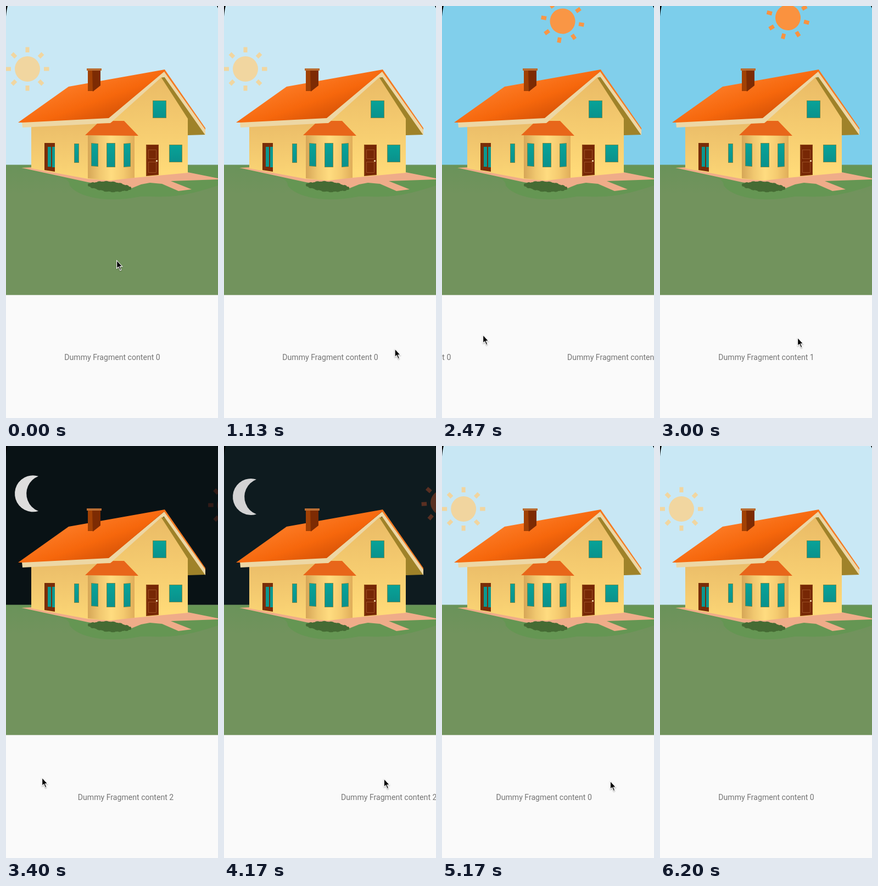
These frames come from a looping animation (386x746 px, 6510 ms). An HTML page with a canvas:

```html
<!DOCTYPE html>
<html lang="en">
<head>
<meta charset="utf-8">
<title>House pager</title>
<style>
  html, body { margin: 0; width: 100%; height: 100%; overflow: hidden; background: #fafafa; }
  canvas { display: block; width: 386px; height: 746px; }
</style>
</head>
<body>
<canvas id="stage" width="386" height="746"></canvas>
<script>
const W = 386, H = 746, LOOP = 6510, HORIZON = 287.5, PAGER_TOP = 523.5;
const DRAG = 250, SETTLE = 260, EXIT = 6150;
const stage = document.getElementById('stage');
const main = stage.getContext('2d');
let c = main;

const SWIPES = [
  { at: 2190, from: 283, to: 75, y: 597, page: 1 },
  { at: 3020, from: 251, to: 66, y: 602, page: 2 },
  { at: 4000, from: 185, to: 341, y: 604, page: 1 },
  { at: 4750, from: 115, to: 305, y: 608, page: 0 }
];

const SCENES = [
  { sky: [201, 232, 245], sun: [39, 114, 0], tint: [241, 214, 160, 1] },
  { sky: [124, 206, 235], sun: [233, 21, 59], tint: [250, 146, 63, 1] },
  { sky: [9, 18, 21], sun: [408, 107, 135], tint: [170, 50, 30, .2] }
];

const lerp = (a, b, k) => a + (b - a) * k;
const mix = (a, b, k) => a.map((v, i) => lerp(v, b[i], k));
const rgba = ([r, g, b, a = 1]) => `rgba(${r | 0},${g | 0},${b | 0},${a})`;

// cubic-bezier(.4, 0, .2, 1)
function ease(x) {
  let lo = 0, hi = 1;
  for (let i = 0; i < 24; i++) {
    const s = (lo + hi) / 2, r = 1 - s;
    if (1.2 * s * r * r + .6 * s * s * r + s * s * s < x) lo = s; else hi = s;
  }
  return lo * lo * (3 - 2 * lo);
}

// The page follows the finger, then settles on the nearest page.
function pageAt(t) {
  let page = 0;
  for (const s of SWIPES) {
    if (t < s.at) break;
    const held = page + (s.from - s.to) / W;
    const u = (t - s.at) / DRAG, v = (t - s.at - DRAG) / SETTLE;
    if (u < 1) return lerp(page, held, u);
    if (v < 1) return lerp(held, s.page, 1 - (1 - v) ** 3);
    page = s.page;
  }
  return page;
}

// Pointer stops [ms, x, y]: wander in, swipe, wait, return, leave
const STOPS = [
  [0, 202, 462], [30, 202, 462], [570, 318, 628], [900, 318, 628],
  ...SWIPES.flatMap(({ at, from, to, y }) => [
    [at - 40, from, y], [at, from, y], [at + DRAG, to, y], [at + DRAG + 150, to, y]
  ]),
  [EXIT, 392, 612]
];

function pointerAt(t) {
  const i = STOPS.findIndex(s => s[0] > t), a = STOPS[i - 1], b = STOPS[i];
  return mix(a, b, (t - a[0]) / (b[0] - a[0])).slice(1);
}

function poly(fill, ...p) {
  c.beginPath();
  for (let i = 0; i < p.length; i += 2) c.lineTo(p[i], p[i + 1]);
  c.closePath();
  c.fillStyle = fill;
  c.fill();
}

function rect(fill, x0, y0, x1, y1) {
  c.fillStyle = fill;
  c.fillRect(x0, y0, x1 - x0, y1 - y0);
}

function disc(x, y, r) {
  c.beginPath();
  c.arc(x, y, r, 0, 7);
  c.fill();
}

function grad(x0, y0, x1, y1, ...colors) {
  const g = c.createLinearGradient(x0, y0, x1, y1);
  colors.forEach((col, i) => g.addColorStop(i / (colors.length - 1), col));
  return g;
}

function pane(x0, y0, x1, y1, skew = 0) {
  const box = (fill, d) => poly(fill, x0 + d, y0 + d, x1 - d, y0 + d + skew,
    x1 - d, y1 - d, x0 + d, y1 - d - skew);
  box('#8d8438', 0);
  box(grad(0, y0, 0, y1, '#08a398', '#0a918c'), .8);
}

function drawGround() {
  rect(grad(0, HORIZON, 0, 340, '#6a935a', '#72935d'), 0, HORIZON, W, PAGER_TOP);
  c.fillStyle = '#659653';
  c.beginPath();
  c.moveTo(20, 290);
  c.bezierCurveTo(70, 310, 118, 305, 116, 325);
  c.bezierCurveTo(130, 345, 180, 358, 245, 345);
  c.bezierCurveTo(290, 345, 310, 350, W, 325);
  c.lineTo(W, 290);
  c.fill();
  poly('#efac89', 28, 293, 46, 292, 331, 301, 386, 312, 386, 314, 300, 317, 338, 332,
    314, 335, 284, 322, 262, 320, 246, 323, 226, 331, 149, 319);
}

function drawWalls() {
  poly(grad(0, 212, 0, 310, '#ebbd69', '#fbd575'),
    46, 215, 190, 208, 190, 316, 149, 313, 46, 294);
  poly(grad(0, 130, 0, 300, '#eabb66', '#ffda78'),
    190, 210, 284, 126, 331, 195, 331, 302, 234, 311, 190, 313);
  poly(grad(149, 0, 234, 0, '#d6a657', '#f0c76f', '#ffdc80', '#f5cb70', '#e0ad59'),
    149, 233, 234, 234, 234, 311, 190, 316, 149, 312);
}

function drawRoof() {
  poly('#9f8229', 283, 130, 291, 128, 363, 233, 331, 234, 331, 204);
  poly('#edd7a5', 289, 118, 363, 223, 363, 234, 288, 128, 283, 129,
    190, 212, 30, 220, 29, 210, 187, 202);
  poly('#f47a22', 289, 115, 363, 221, 363, 224, 288, 119);
  poly(grad(165, 125, 195, 208, '#fc7a24', '#f6670c', '#d25006'),
    22, 211, 114, 146, 289, 115, 289, 118, 187, 203, 30, 211);
  poly('#e8661a', 144, 234, 166, 213, 190, 212, 195, 208, 215, 208, 241, 235);
  poly('#a14105', 149, 116, 158, 116, 158, 154, 149, 154);
  poly('#7d2b03', 157, 116, 172, 116, 172, 144, 158, 155);
  rect('#b96c32', 147, 113, 174, 117);
}

function drawOpenings() {
  poly('#792d09', 70, 248, 89, 248, 89, 300, 70, 297);
  rect('#0a9891', 76, 255, 82, 291);
  rect('#0a9891', 84, 255, 89, 292);
  pane(124, 249, 133, 284);
  pane(155, 248, 168, 291, 1);
  pane(183, 248, 199, 292);
  pane(214, 249, 227, 291, -1);
  pane(267, 171, 292, 203);
  pane(297, 251, 321, 283);
  poly('#8a4212', 255, 251, 278, 251, 278, 306, 255, 308);
  poly('#772705', 257, 252, 277, 252, 277, 305, 257, 307);
  c.strokeStyle = '#a55a2c';
  c.lineWidth = .8;
  c.strokeRect(259.5, 260.5, 14, 16);
  c.strokeRect(259.5, 282.5, 14, 19);
  rect('#e6c79d', 273, 279, 276, 282);
}

function drawBush() {
  c.fillStyle = '#456b34';
  for (let i = 0; i <= 12; i++) {
    const swell = Math.sin(i / 12 * Math.PI);
    disc(152 + i * 6.1, 324 + i * .5, 3 + 6 * swell + i % 2);
  }
}

// The house never moves, so it is painted once.
const house = document.createElement('canvas');
house.width = W;
house.height = H;
c = house.getContext('2d');
[drawGround, drawWalls, drawRoof, drawOpenings, drawBush].forEach(part => part());
c = main;

function drawSun([x, y, turn], tint) {
  c.save();
  c.translate(x, y);
  c.rotate(turn * Math.PI / 180);
  c.fillStyle = rgba(tint);
  disc(0, 0, 23);
  for (let i = 0; i < 8; i++) {
    c.fillRect(30, -3.5, 9.5, 7);
    c.rotate(Math.PI / 4);
  }
  c.restore();
}

function drawMoon(y, alpha) {
  const out = Math.atan2(31.5, 10), inn = Math.atan2(31.5, -12);
  c.fillStyle = `rgba(222,222,222,${alpha})`;
  c.beginPath();
  c.arc(49, y, 33, out, -out);
  c.arc(71, y, 33.8, -inn, inn, true);
  c.fill();
}

function drawPages(pos) {
  rect('#fafafa', 0, PAGER_TOP, W, H);
  c.fillStyle = '#757575';
  c.font = '14.1px Roboto, sans-serif';
  c.textAlign = 'center';
  for (let i = 0; i < 3; i++) {
    c.fillText('Dummy Fragment content ' + i, 193.5 + (i - pos) * W, 641);
  }
}

function drawPointer([x, y]) {
  c.save();
  c.translate(x - .5, y - 1.5);
  c.shadowColor = 'rgba(0,0,0,.35)';
  c.shadowBlur = 2;
  c.shadowOffsetY = 1;
  poly('#fff', -.5, -1, -.5, 16, 3.2, 12.8, 6, 19, 9, 17.7, 6.4, 11.7, 11.5, 11.7);
  c.shadowColor = 'transparent';
  poly('#000', .7, 1.6, .7, 13.4, 3.6, 10.9, 6.5, 17.5, 7.7, 17, 5, 10.6, 9, 10.6);
  c.restore();
}

function drawCorners() {
  c.fillStyle = '#000';
  c.beginPath();
  c.moveTo(0, 0);
  c.lineTo(3, 0);
  c.quadraticCurveTo(1, 7, 0, 19);
  c.fill();
  poly('#000', 384, 0, 386, 0, 386, 4);
}

function draw(t) {
  const pos = pageAt(t);
  const i = Math.min(1, Math.floor(pos)), part = pos - i, k = ease(part);
  const a = SCENES[i], b = SCENES[i + 1];
  rect(rgba(mix(a.sky, b.sky, k)), 0, 0, W, HORIZON + 1);
  drawSun(mix(a.sun, b.sun, k), mix(a.tint, b.tint, i ? part : k));
  if (i && k > .001) drawMoon(203 - 117 * k, k);
  c.drawImage(house, 0, 0);
  drawPages(pos);
  drawCorners();
  if (t < EXIT) drawPointer(pointerAt(t));
}

const start = performance.now();
function tick() {
  draw((performance.now() - start) % LOOP);
  requestAnimationFrame(tick);
}
tick();
</script>
</body>
</html>
```
